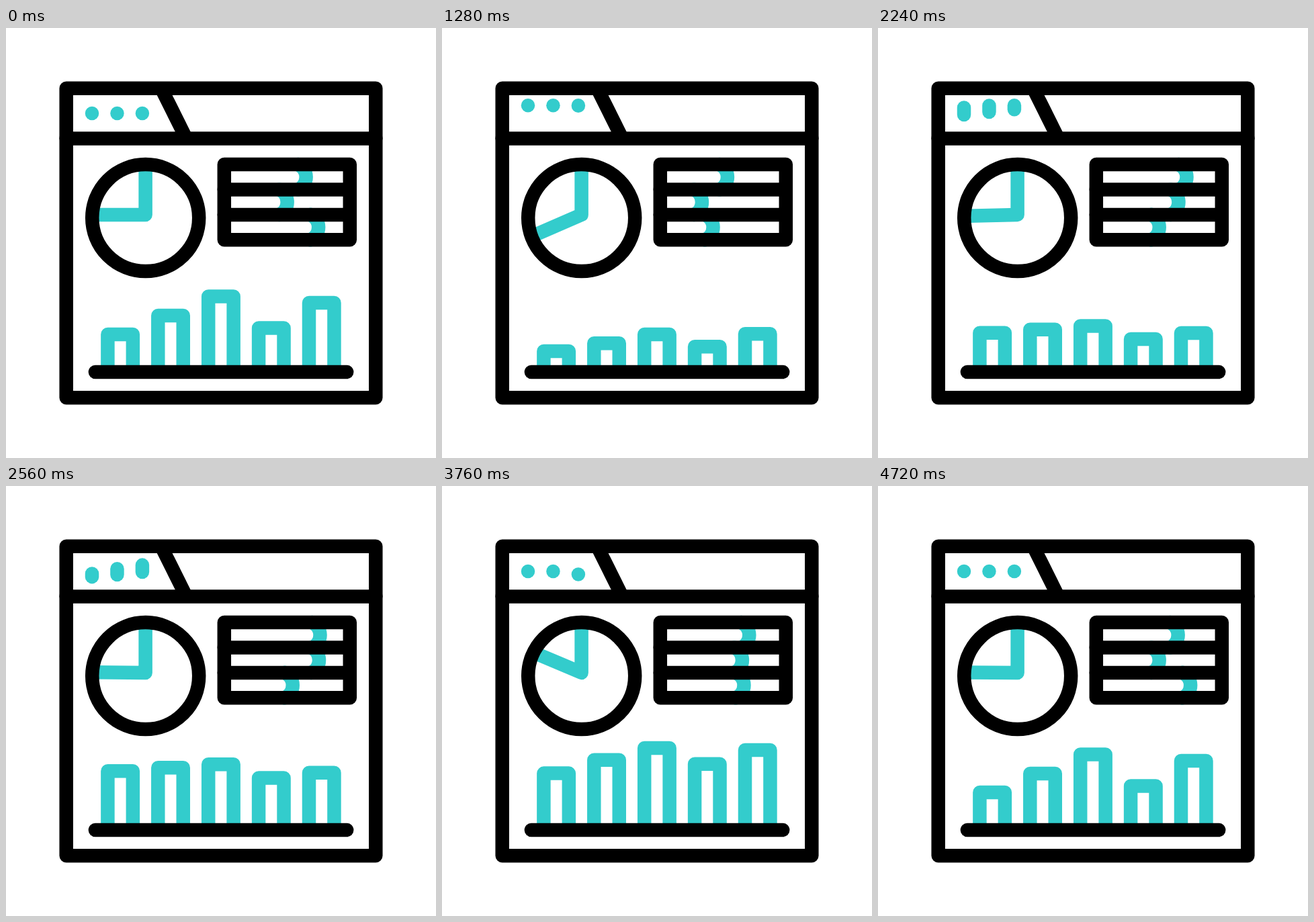
Write an HTML page that moves like this. It is 640x640 px and loops after 4.84 s.

```html
<!DOCTYPE html>
<html lang="en">
<head>
<meta charset="utf-8">
<title>Dashboard</title>
<style>
  html, body { margin: 0; width: 100%; height: 100%; overflow: hidden; background: #fff; }
  svg { display: block; width: 100%; height: 100%; }
  path, circle, rect { fill: none; stroke-width: 20.5; stroke-linejoin: round; stroke-linecap: round; }
  .ink { stroke: #000; }
  .teal { stroke: #33cccc; }
  .flat { stroke-linecap: butt; }
</style>
</head>
<body>
<svg viewBox="0 0 640 640">
  <g id="moving" class="teal"></g>
  <g class="ink">
    <rect x="89.7" y="89.7" width="460.6" height="460.6"/>
    <path d="M89.7 164.5H550.3"/>
    <path class="flat" d="M231 89.7L268.3 164.5"/>
    <circle cx="207.7" cy="282.6" r="79.5"/>
    <rect x="324.8" y="203.1" width="187" height="112.2"/>
    <path d="M324.8 240.5H511.8M324.8 277.9H511.8"/>
    <path d="M132.9 512H507.2"/>
  </g>
</svg>
<script>
const LOOP = 4840, STEP = 40, LAST = 4720;
const BASE = 512, GAP = 37.45;
const group = document.getElementById('moving');

function addPath(cls) {
  const p = document.createElementNS('http://www.w3.org/2000/svg', 'path');
  if (cls) p.setAttribute('class', cls);
  group.appendChild(p);
  return p;
}

// Symmetric ease-in-out, cubic-bezier(.42, 0, .58, 1)
function ease(x) {
  if (x <= 0) return 0;
  if (x >= 1) return 1;
  let lo = 0, hi = 1;
  for (let i = 0; i < 24; i++) {
    const u = (lo + hi) / 2, v = 1 - u;
    const bx = 1.26 * v * v * u + 1.74 * v * u * u + u * u * u;
    if (bx < x) lo = u; else hi = u;
  }
  return lo * lo * (3 - 2 * lo);
}

// Each move is [begin, end, value]
function track(t, value, ...moves) {
  let out = value;
  for (const [begin, end, next] of moves) {
    if (t <= begin) break;
    out = value + (next - value) * ease((t - begin) / (end - begin));
    value = next;
  }
  return out;
}

const bars = [56, 84, 112.4, 65.4, 103].map(rest => ({ rest, el: addPath('flat') }));
const dots = [0, 1, 2].map(() => addPath());
const marks = [0, 1, 2].map(() => addPath());
const hand = addPath();

// Every bar sinks, rises and settles; its swing is a third of its height plus an offset
function barHeight(t, rest) {
  const move = (begin, h) => [begin, begin + 1420, h];
  return track(t, rest, move(104, rest / 3 + 10.7), move(1640, rest / 3 + 89.3), move(3088, rest));
}

// Both ends of a dot visit the same heights, the tail later than the head
const dotHead = t => track(t, 127, [0, 420, 115.2], [1235, 3075, 139], [3180, 3560, 127]);
const dotTail = t => track(t, 127, [250, 1030, 115.2], [1980, 2970, 139], [3180, 3560, 127]);

const markX = [
  t => track(t, 446.7, [0, 1090, 425], [1305, 2655, 468], [2800, 4720, 446.7]),
  t => track(t, 418.7, [0, 1130, 387], [1332, 2732, 468.5], [2940, 4720, 418.7]),
  t => track(t, 465.2, [0, 1210, 403.6], [1380, 3000, 431], [3000, 4450, 465.2])
];

function handAngle(t) {
  const begin = 78, quarter = 1182;
  const move = (k, deg) => [begin + k * quarter, begin + (k + 1) * quarter, deg];
  return track(t, 0, move(0, 23.5), move(1, 0), move(2, -23.5), move(3, 0)) * Math.PI / 180;
}

function draw(t) {
  bars.forEach(({ rest, el }, i) => {
    const x = 151.4 + 2 * GAP * i, top = BASE - barHeight(t - 50 * i, rest);
    el.setAttribute('d', `M${x} ${BASE}V${top}h${GAP}V${BASE}`);
  });

  dots.forEach((el, i) => {
    const at = t - 180 * i;
    el.setAttribute('d', `M${128 + GAP * i} ${dotHead(at)}V${dotTail(at) + 0.01}`);
  });

  marks.forEach((el, i) => {
    const x = markX[i](t) - 12, y = 203.1 + 37.4 * i;
    el.setAttribute('d', `M${x} ${y}a20.6 20.6 0 0 1 0 37.4`);
  });

  const a = handAngle(t);
  const hx = 207.6 - 74 * Math.cos(a), hy = 277.9 + 74 * Math.sin(a);
  hand.setAttribute('d', `M207.6 205V277.9L${hx} ${hy}`);
}

const start = performance.now();
function tick() {
  const t = (performance.now() - start) % LOOP;
  draw(Math.min(LAST, Math.floor(t / STEP) * STEP));
  requestAnimationFrame(tick);
}
tick();
</script>
</body>
</html>
```
